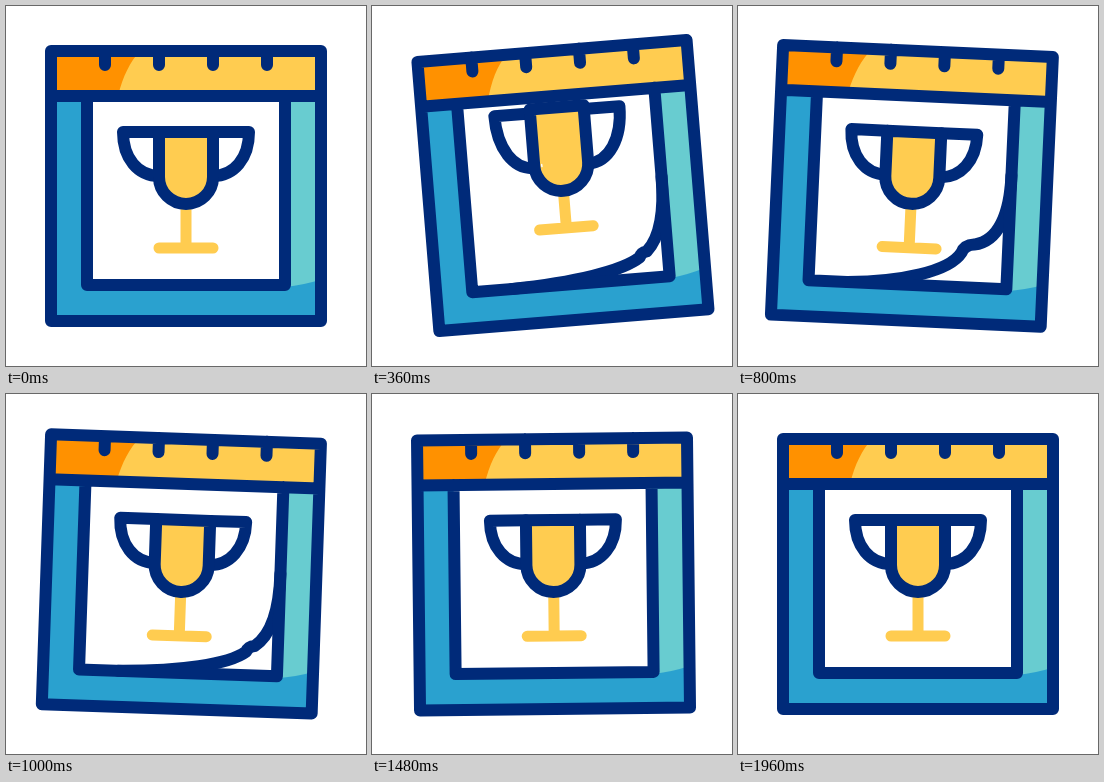
Write an HTML page that moves like this. It is 360 px wide and 360 px high and loops after 2000 ms.

```html
<!DOCTYPE html>
<html>
<head>
<meta charset="utf-8">
<style>
html, body { margin: 0; width: 100%; height: 100%; overflow: hidden; background: #fff; }
svg { display: block; width: 100vw; height: 100vh; }
.line { fill: none; stroke: #002a79; stroke-width: 12; stroke-linecap: round; stroke-linejoin: round; }
.gold { fill: none; stroke: #ffcc50; stroke-width: 11; stroke-linecap: round; }
</style>
</head>
<body>
<svg viewBox="0 0 360 360">
  <g id="calendar">
    <path fill="#2aa1cf" d="M45 45H315V315H45Z"/>
    <path fill="#68ccd0" d="M279 90H315V273.500Q298 279 279 281Z"/>
    <path fill="#ffcc50" d="M45 45H315V90H45Z"/>
    <path fill="#ff9100" d="M45 45H134C124 56 117 70 112 90H45Z"/>
    <path fill="#fff" d="M81 90H279V279H81Z"/>
    <path class="line" id="curl"/>
    <path class="gold" id="stand"/>
    <path class="line" id="handles"/>
    <path class="line" id="cup" style="fill:#ffcc50"/>
    <path id="shine" fill="#fff" stroke="#fff" stroke-width="1.5" stroke-linejoin="round"/>
    <path class="line" d="M81 90V279H279V90M45 90H315M45 45H315V315H45ZM99 45V59M153 45V59M207 45V59M261 45V59"/>
  </g>
</svg>
<script>
const part = id => document.getElementById(id);
const draw = (id, d) => part(id).setAttribute('d', d);
const mix = (a, b, u) => a + (b - a) * u;
const clamp = u => Math.min(1, Math.max(0, u));
const ease = u => (u = clamp(u), u * u * (3 - 2 * u));

// Eased value through [time, value] keys
function track(keys, t) {
  const i = keys.findIndex(k => k[0] > t);
  if (i < 0) return keys[keys.length - 1][1];
  if (i === 0) return keys[0][1];
  const [t0, a] = keys[i - 1], [t1, b] = keys[i];
  return mix(a, b, ease((t - t0) / (t1 - t0)));
}

const swing = [[0, 0], [430, -5], [860, 3], [1290, -1.1], [1720, 0]];
const peel = [[100, 0], [600, 1], [1520, 0]];
const leap = [[40, 0], [340, 1], [580, 0]];
const spins = [[20, 400], [1015, 1415]];

function drawCurl(a) {
  const p = (x0, y0, x1, y1) => mix(x0, x1, a) + ' ' + mix(y0, y1, a);
  draw('curl', a < 0.01 ? '' :
    `M${p(279, 200, 279, 160)}C${p(279, 225, 279, 200)} ${p(279, 250, 268, 229)} ${p(279, 278, 240, 230)}` +
    `Q${p(279, 278, 229, 231)} ${p(279, 278, 226, 240)}` +
    `C${p(250, 279, 217, 262)} ${p(200, 279, 170, 276)} 120 279`);
}

function drawTrophy(jump, turn) {
  const top = 126 - 25 * jump, bottom = 198 - 13 * jump, base = 242 - 20 * jump;
  const hTop = 126 - 21 * jump, hBottom = 170 - 10 * jump;
  const handle = side => {
    const x = d => 180 + side * d * turn;
    return `M${x(27)} ${hTop}H${x(63)}C${x(63)} ${mix(hTop, hBottom, 0.6)} ${x(48)} ${hBottom} ${x(27)} ${hBottom}`;
  };
  draw('stand', `M180 ${bottom}V${base}M${180 - 27 * turn} ${base}H${180 + 27 * turn}`);
  draw('handles', handle(-1) + handle(1));
  draw('cup', `M153 ${top}H207V${bottom - 27}A27 27 0 0 1 153 ${bottom - 27}Z`);
}

// A glint that runs along the bottom of the cup from right to left
function drawShine(u, jump) {
  const from = Math.PI * ease((u - 0.48) / 0.47), to = Math.PI * ease(u / 0.46);
  if (to - from < 0.02) return draw('shine', '');
  const at = a => `${180 + 19.5 * Math.cos(a)} ${170 - 13 * jump + 19.5 * Math.sin(a)}`;
  draw('shine', `M${at(from)}A19.5 19.5 0 0 1 ${at(to)}A28 28 0 0 0 ${at(from)}Z`);
}

function frame(now) {
  const t = now % 2000;
  const jump = track(leap, t);
  const spin = spins.find(([a, b]) => t > a && t < b);
  const u = spin ? (t - spin[0]) / (spin[1] - spin[0]) : 0;
  part('calendar').setAttribute('transform', `rotate(${track(swing, t)} 180 45)`);
  drawCurl(track(peel, t));
  drawTrophy(jump, Math.abs(Math.cos(Math.PI * ease(u))));
  drawShine(u, jump);
}

const start = performance.now();
function loop() {
  frame(performance.now() - start);
  requestAnimationFrame(loop);
}
loop();
</script>
</body>
</html>
```
